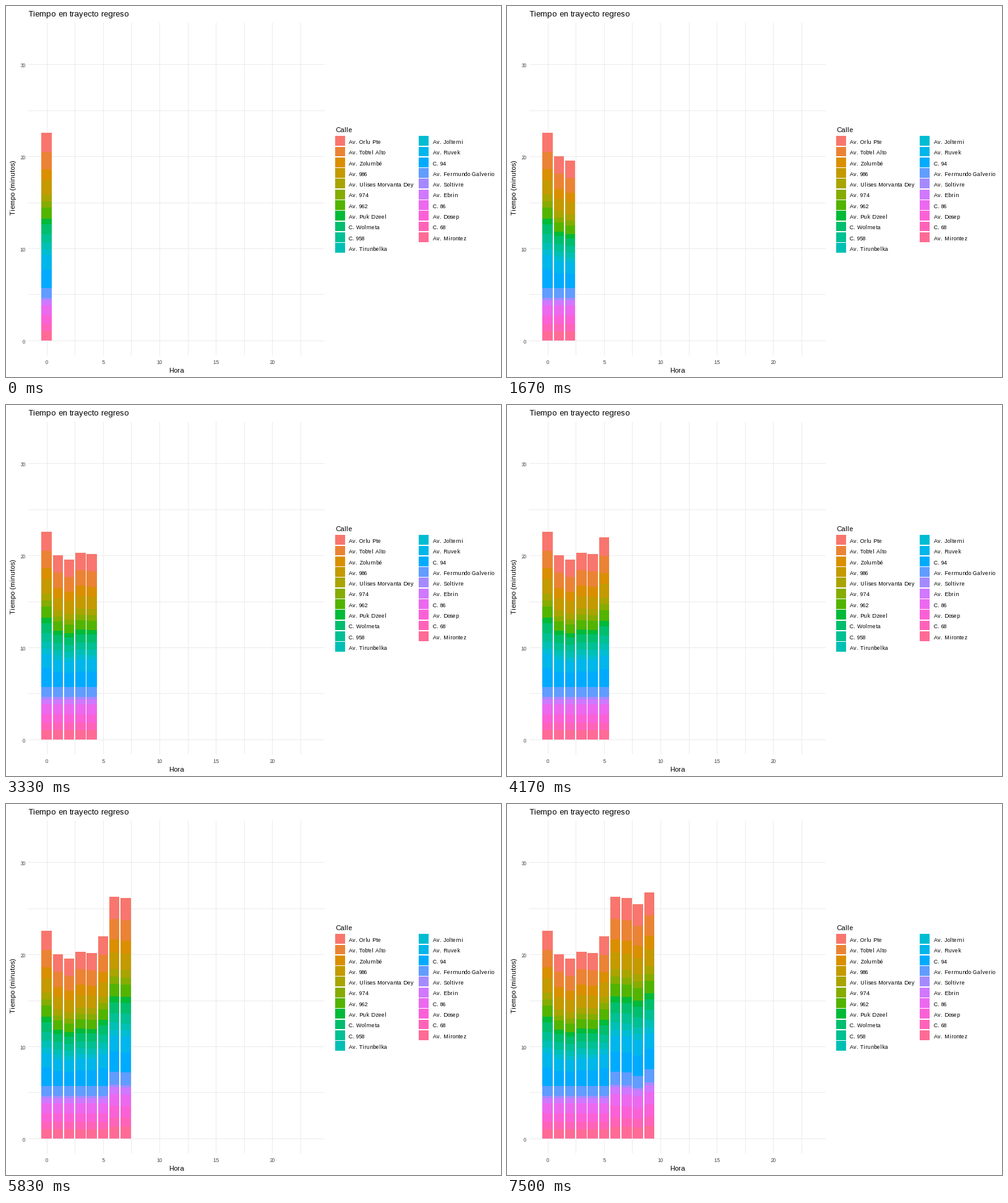
A matplotlib script that plays this animation: 800x600 px, repeating every 8 s.

```python
import math

import numpy as np
import matplotlib
import matplotlib.pyplot as plt
from matplotlib.animation import FuncAnimation
from matplotlib.collections import PolyCollection

# Whole-pixel glyph widths without kerning, for a plain screen-text look
matplotlib.rcParams.update({
    "font.family": "Liberation Sans",
    "text.hinting": "force_autohint",
    "text.hinting_factor": 1,
    "text.kerning_factor": 6,
})

W, H, DPI = 800, 600, 100
LOOP, STEP = 8000, 40
BAR_TIME = 5000 / 6

X0, PER_HOUR, HALF_BAR = 65.55, 18.245, 8.24
Y0, PER_MINUTE = 541.3, 14.885
KEY_STEP = 17.28

STREETS = [
    "Av. Orlu Pte", "Av. Tob'el Alto", "Av. Zolumbé", "Av. 986",
    "Av. Ulises Morvanta Dey", "Av. 974", "Av. 962", "Av. Puk Dzeel",
    "C. Wolmeta", "C. 958", "Av. Tirunbelka", "Av. Joltemi", "Av. Ruvek",
    "C. 94", "Av. Fermundo Galverio", "Av. Soltivre", "Av. Ebrin", "C. 86",
    "Av. Dosep", "C. 68", "Av. Mirontez",
]

# Trip time for each hour, and how each third of a bar is shared out (percent)
MINUTES = [22.6, 20.05, 19.55, 20.3, 20.2, 22, 26.3, 26.15, 25.5, 26.75]
SHARES = [
    [26, 23, 15, 19, 9, 8],
    [14, 7, 12, 11, 8, 7, 18, 23],
    [19, 4, 10, 18, 17, 14, 18],
]


def hcl(hue, chroma=100, lum=65):
    """Polar LUV colour as sRGB."""
    a = math.radians(hue)
    y = ((lum + 16) / 116) ** 3
    u = chroma * math.cos(a) / (13 * lum) + 0.1978398
    v = chroma * math.sin(a) / (13 * lum) + 0.4683363
    x = 9 * y * u / (4 * v)
    z = -x / 3 - 5 * y + 3 * y / v
    linear = (3.240479 * x - 1.537150 * y - 0.498535 * z,
              -0.969256 * x + 1.875992 * y + 0.041556 * z,
              0.055648 * x - 0.204043 * y + 1.057311 * z)
    rgb = [1.055 * c ** (1 / 2.4) - 0.055 if c > 0.00304 else 12.92 * c
           for c in linear]
    return tuple(min(max(c, 0), 1) for c in rgb)


def near(v):
    return math.floor(v + 0.5)


def x_of(hour):
    return X0 + PER_HOUR * hour


def y_of(minutes):
    return Y0 - PER_MINUTE * minutes


def rect(x0, y0, x1, y1):
    return [(x0, y0), (x1, y0), (x1, y1), (x0, y1)]


def add_rects(rects, colors, z):
    group = PolyCollection(rects, facecolors=colors, edgecolors="none",
                           linewidths=0, antialiaseds=False, zorder=z)
    return ax.add_collection(group, autolim=False)


def label(x, y, text, px, color="black", ha="left", **kw):
    kw.setdefault("va", "baseline")
    ax.text(x, y, text, fontsize=px * 72 / DPI, color=color, ha=ha, **kw)


def segment_edges(total):
    """Pixel rows of a bar's segment edges, top to bottom."""
    ends = [total, 0.64 * total, max(5.73, 0.6 * total - 8.5), 0]
    edges = [total]
    for start, end, shares in zip(ends, ends[1:], SHARES):
        edges += list(start + (end - start) * np.cumsum(shares) / 100)
    return [near(y_of(m)) for m in edges]


def bar_rects(hour, total):
    left = near(x_of(hour) - HALF_BAR)
    right = near(x_of(hour) + HALF_BAR)
    ys = segment_edges(total)
    return [rect(left, a, right, b) for a, b in zip(ys, ys[1:])]


fig = plt.figure(figsize=(W / DPI, H / DPI), dpi=DPI, facecolor="white")
ax = fig.add_axes([0, 0, 1, 1])
ax.set_xlim(0, W)
ax.set_ylim(H, 0)
ax.axis("off")

palette = [hcl(15 + 360 * i / len(STREETS)) for i in range(len(STREETS))]

# Grid and axes
cols = [near(x_of(2.5 * i)) for i in range(10)]
rows = [math.floor(y_of(5 * i)) for i in range(7)]
grid = [rect(x, 27, x + 1, 565) for x in cols]
grid += [rect(36, y, 515, y + 1) for y in rows]
add_rects(grid, ["#EBEBEB"], 1)

for i, x in enumerate(cols[::2]):
    label(x, 579, str(5 * i), 9, "#4D4D4D", "center")
for i, y in enumerate(rows[::2]):
    label(31, y + 5, str(10 * i), 9, "#4D4D4D", "right")

label(36, 17, "Tiempo en trayecto regreso", 13)
label(275.5, 593, "Hora", 11, ha="center")
label(17, 294, "Tiempo (minutos)", 11, ha="right", va="center", rotation=90)

# Legend
label(532, 204, "Calle", 11)
keys = []
for i, street in enumerate(STREETS):
    col, row = divmod(i, 11)
    x, dy = 532 + 135 * col, KEY_STEP * row
    keys.append(rect(x, near(210.3 + dy), x + 16, near(226.15 + dy)))
    label(x + 22 + col, near(223 + dy), street, 9)
add_rects(keys, palette, 2)

# Stacked bars, one more each step
bars = [add_rects(bar_rects(hour, total), palette, 3)
        for hour, total in enumerate(MINUTES)]


def draw(frame):
    last = int((frame + 1) * STEP / BAR_TIME)
    for hour, bar in enumerate(bars):
        bar.set_visible(hour <= last)
    return bars


anim = FuncAnimation(fig, draw, frames=LOOP // STEP, interval=STEP,
                     repeat=True, repeat_delay=0, blit=False)
plt.show()
```
